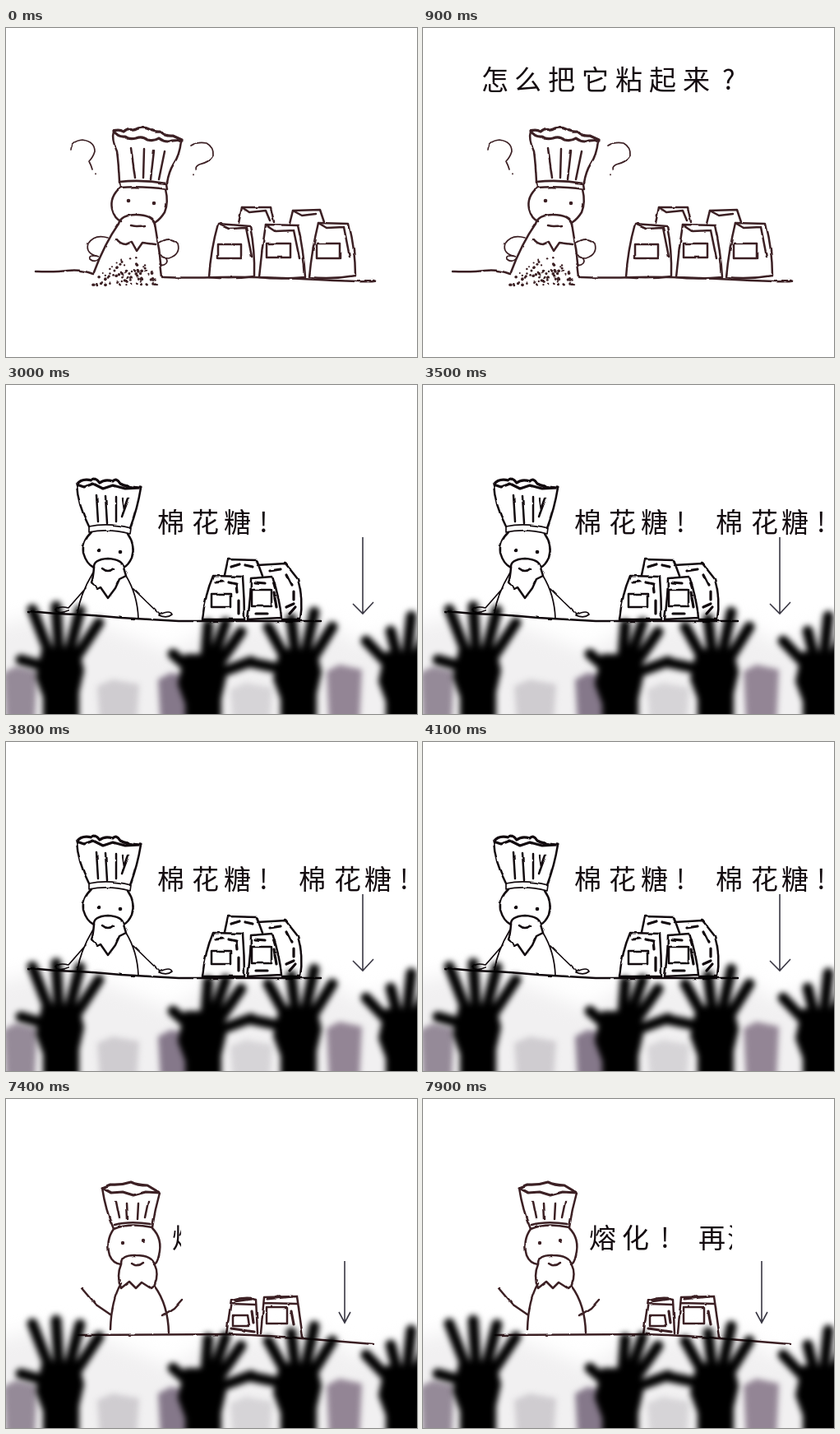
An HTML page that plays this animation: 500x400 px, repeating every 8 s.

```html
<!DOCTYPE html>
<html lang="zh">
<head>
<meta charset="utf-8">
<title>Chef sketch</title>
<style>
html, body { margin: 0; width: 100%; height: 100%; overflow: hidden; background: #fff; }
#stage { position: relative; width: 500px; height: 400px; overflow: hidden; }
svg { position: absolute; left: 0; top: 0; width: 500px; height: 400px; overflow: hidden; }

.scene, .crowd { visibility: hidden; animation: 8s step-end infinite; }
.scene { --ink: #3c2024; }
.puzzled { animation-name: show-puzzled; }
.shout { animation-name: show-shout; --ink: #120a0e; }
.ask { animation-name: show-ask; }
.melt { animation-name: show-melt; }
.crowd { animation-name: show-crowd; mix-blend-mode: multiply; }
@keyframes show-puzzled { 0% { visibility: visible } 31.25%, 100% { visibility: hidden } }
@keyframes show-shout { 0%, 60% { visibility: hidden } 31.25% { visibility: visible } }
@keyframes show-ask { 0%, 92.5% { visibility: hidden } 60% { visibility: visible } }
@keyframes show-melt { 0% { visibility: hidden } 92.5%, 100% { visibility: visible } }
@keyframes show-crowd { 0%, 60% { visibility: hidden } 31.25%, 92.5%, 100% { visibility: visible } }

.ink { fill: none; stroke: var(--ink); stroke-width: 2.5; stroke-linecap: round; stroke-linejoin: round; filter: url(#rough); }
.thin { stroke-width: 1.7; }
.bold { stroke-width: 3.2; }
.dot { fill: var(--ink); stroke: none; }
.arrow { fill: none; stroke: #3a3844; stroke-width: 1.6; }

/* Lettering is uncovered from left to right in 100 ms steps */
.words { font: 300 33px "Noto Sans CJK SC", "Noto Sans CJK", sans-serif; fill: #140c10; animation: 8s linear infinite; }
.puzzled .words { animation-name: write-puzzled; }
.shout .words { animation-name: write-shout; }
.ask .words { animation-name: write-ask; }
.melt .words { animation-name: write-melt; }
@keyframes write-puzzled {
  0% { width: 71px; animation-timing-function: steps(9) }
  11.25%, 100% { width: 384px }
}
@keyframes write-shout {
  0% { width: 185px }
  31.25% { width: 185px; animation-timing-function: steps(10) }
  43.75%, 100% { width: 500px }
}
@keyframes write-ask {
  0% { width: 128px }
  61.25% { width: 128px; animation-timing-function: steps(5) }
  67.5%, 100% { width: 268px }
}
@keyframes write-melt {
  0% { width: 180px }
  91.25% { width: 180px; animation-timing-function: steps(6) }
  98.75%, 100% { width: 376px }
}
</style>
</head>
<body>
<div id="stage">

<div class="scene puzzled">
  <svg>
    <defs>
      <filter id="rough" filterUnits="userSpaceOnUse" x="0" y="0" width="500" height="400" color-interpolation-filters="sRGB">
        <feTurbulence type="fractalNoise" baseFrequency=".06" numOctaves="2" seed="4"/>
        <feDisplacementMap in="SourceGraphic" scale="2.5" xChannelSelector="R" yChannelSelector="G"/>
      </filter>
    </defs>
    <g class="ink">
      <path d="M36 296Q60 297 75 295T106 299M192 303Q220 304 260 303T380 306T446 307"/>
      <path class="bold" d="M131 125Q138 123 143 126Q150 120 156 124Q165 119 173 123Q182 127 188 126Q195 132 203 131L214 136M131 125Q136 133 145 132Q150 136 158 134Q166 131 172 136Q180 138 186 134Q194 140 202 137L214 136"/>
      <path d="M131 126Q128 135 135 150Q137 165 138 187M213 138Q211 155 204 165Q198 175 196 188M152 146L157 182M168 147L167 182M180 149L176 184M193 150L186 184"/>
      <path d="M138 187Q165 184 195 189L196 196Q165 192 139 194Z"/>
      <path d="M139 194Q126 205 129 220Q132 232 140 235M194 196Q198 212 193 224Q188 232 182 236M137 238Q140 227 158 227Q178 227 181 238M152 240Q160 242 169 240"/>
      <path d="M134 256Q139 263 146 263L153 260L159 271L166 261L182 263M137 238Q120 262 107 297M181 238Q187 270 190 303"/>
      <path class="thin" d="M124 255Q108 250 100 262Q96 274 112 278Q100 275 102 281Q108 286 114 280M185 262Q200 252 209 262Q213 275 198 280Q190 280 186 275M187 277Q199 280 195 286Q191 290 187 287"/>
      <circle class="dot" cx="149" cy="210" r="2.3"/><circle class="dot" cx="180" cy="213" r="2.3"/>
      <path class="thin" d="M79 148Q80 137 93 136Q108 138 108 150Q106 157 101 162Q104 168 105 172M109 177v.5M225 143Q233 138 244 140Q253 145 252 155Q248 163 235 166Q231 168 231 171M228 178v.5"/>
      <path d="M247 303Q249 270 258 238L297 241Q303 270 302 302M247 303Q275 306 302 302M308 303Q311 270 316 239L355 240Q362 270 364 303M308 303Q335 306 364 303M369 303Q372 270 380 237L417 238Q425 270 425 301Q396 306 369 303"/>
      <path d="M258 263h28v17h-28zM317 262h29v17h-29zM378 262h28v18h-28zM283 237L287 218L322 218L326 236M345 238L349 222L382 221L387 236"/>
      <path d="M258 238L271 244L292 243M292 243L299 278M316 239L328 247L350 246M350 246L357 280M380 237L390 243L411 242M411 242L418 278M287 218L296 224L316 222L321 234M349 222L360 228L377 226"/>
      <g id="pile"></g>
    </g>
  </svg>
  <svg class="words"><text y="75" x="71 111 152 193 234 275 316 364">怎么把它粘起来?</text></svg>
</div>

<div class="scene shout">
  <svg>
    <g class="ink">
      <path d="M27 275L62 278Q100 279 140 283L210 287L383 287"/>
      <path class="bold" d="M86 121Q92 113 104 116Q108 111 114 119Q120 114 130 117Q134 112 139 120Q146 124 164 125M86 121L95 124L106 120L118 126L130 122L145 126L164 125"/>
      <path d="M86 121Q87 145 101 172M164 125Q160 150 151 174M110 134L112 166M121 135L123 168M134 136V166M149 138L141 160M142 138L144 152"/>
      <path class="thin" d="M101 172Q125 167 152 174L151 181Q125 174 101 179Z"/>
      <path d="M104 179Q92 190 94 204Q98 218 107 222M148 181Q158 195 153 210Q149 219 143 222M107 222Q106 212 124 211Q142 212 143 222M117 223Q124 229 131 223"/>
      <path d="M107 222Q106 235 104 240L111 248L115 246L124 259L133 247L138 236L146 232L143 222"/>
      <path class="thin" d="M106 228Q90 255 87 277M146 232Q160 255 161 284M97 247L76 271Q64 268 60 274Q64 279 77 274M155 248L187 279Q200 273 202 279Q196 284 186 280"/>
      <circle class="dot" cx="113" cy="201" r="2.3"/><circle class="dot" cx="139" cy="203" r="2.3"/>
      <path d="M239 285Q242 255 252 232L288 233Q290 260 290 285ZM266 231L270 212L305 213L312 232M294 285Q298 255 298 235L324 233Q333 260 335 283ZM306 219L340 217L355 236Q362 260 358 285H336"/>
      <path d="M250 254h23v16h-23zM299 249h24v20h-24z"/>
      <path class="bold" d="M255 240L264 239M271 240L280 242L281 252M283 262V278M274 221L284 218M291 219L300 221M303 240L315 241M326 252L329 270M321 226L334 224M341 231L347 243M350 251V261M341 270L350 266M345 278L352 270M304 278H318"/>
    </g>
    <path class="arrow" d="M434 185V277M422 266L434 278L447 264"/>
  </svg>
  <svg class="words"><text y="179" x="184 226 265 308 356 399 436 479">棉花糖!棉花糖!</text></svg>
</div>

<div class="scene ask">
  <svg>
    <g class="ink">
      <path d="M73 267L160 266L300 262L383 262"/>
      <path class="bold" d="M73 267L138 266M127 111L138 103L146 107L154 101L162 107L171 103L180 109L188 105L198 113M127 111L138 117L148 113L158 118L170 114L182 120L198 113"/>
      <path d="M127 112Q130 130 137 151M198 113Q192 130 189 148M148 122L151 142M158 122L160 145M171 123L170 145M183 121L178 143M138 154Q160 146 189 150"/>
      <path d="M140 153Q130 165 135 180Q138 186 141 189M189 151Q199 165 194 182Q190 191 183 194M140 189Q140 177 158 175Q178 175 183 189M157 186Q166 193 174 185"/>
      <path d="M140 189Q134 205 146 208L153 213L158 209L165 215L172 208Q182 213 185 206Q187 198 183 189M146 208Q134 230 134 265M183 208Q212 225 214 265"/>
      <path class="thin" d="M142 223Q122 222 121 235Q124 245 137 247Q122 250 124 256Q132 256 138 252"/>
      <path d="M208 230L218 204Q217 190 220 187Q225 190 227 196L247 197L232 200L249 201L234 204L246 206L218 207"/>
      <circle class="dot" cx="153" cy="167" r="2.2"/><circle class="dot" cx="173" cy="166" r="2.2"/>
      <path d="M242 263Q246 235 250 208L283 207Q290 235 294 262M268 206L275 187L302 185L312 205M313 205L318 187L350 184Q365 215 368 258L350 262M292 258Q294 235 298 207L337 205Q344 235 344 261"/>
      <path d="M252 231h26v17h-26zM302 225h24v16h-24z"/>
      <path d="M250 208L260 214L279 212M283 222L286 238M288 246L289 256M275 187L283 194L300 192M318 187L326 194L346 191M298 207L308 212L331 210M333 217L336 230M337 238V252M352 204L355 215M357 225L359 240"/>
    </g>
  </svg>
  <svg class="words"><text y="72" x="127 164 209 249" font-size="32">怎么做?</text></svg>
</div>

<div class="scene melt">
  <svg>
    <g class="ink">
      <path d="M88 287L270 286Q330 288 360 291L447 298"/>
      <path class="bold" d="M117 108L127 104Q140 105 152 101Q160 105 172 105L187 114M117 108L128 114L142 113L155 117L170 113L187 114"/>
      <path d="M117 108Q121 135 131 158M187 114Q181 135 178 156M134 125L138 145M147 127L148 146M161 127L160 146M173 125L169 144M131 158Q150 150 178 156M132 153Q150 148 176 152"/>
      <path d="M131 158Q121 172 126 190Q130 200 140 201M178 157Q191 170 186 190Q184 200 180 201M153 200Q160 205 167 199"/>
      <path d="M140 201Q140 189 158 190Q178 190 181 202Q186 212 181 226L176 230L165 223L158 230L150 222L140 230Q134 215 140 201M140 224Q128 245 127 280M181 228Q197 250 198 284"/>
      <path d="M92 230L108 249L127 262M191 263L205 254L214 244"/>
      <circle class="dot" cx="142" cy="175" r="2.2"/><circle class="dot" cx="167" cy="172" r="2.2"/>
      <path d="M268 286L274 245Q290 240 304 243L306 285M274 249L304 250M310 285L314 241L354 240L361 290M314 248L354 249M276 263h18l2 13h-20zM317 253h25v20h-25z"/>
      <path class="bold" d="M278 246L299 243M319 243L348 240M299 258L301 272M347 258L350 274M274 279L302 283"/>
    </g>
    <path class="arrow" d="M412 197V271M405 259L412 272L419 259"/>
  </svg>
  <svg class="words"><text y="181" x="202 242 289 335 370 411 452">熔化!再混合!</text></svg>
</div>

<svg class="crowd">
  <defs>
    <filter id="soft" filterUnits="userSpaceOnUse" x="-40" y="220" width="580" height="240" color-interpolation-filters="sRGB"><feGaussianBlur stdDeviation="3.5"/></filter>
    <filter id="haze" filterUnits="userSpaceOnUse" x="-60" y="200" width="620" height="280" color-interpolation-filters="sRGB"><feGaussianBlur stdDeviation="11"/></filter>
  </defs>
  <path fill="#f1f0f1" filter="url(#haze)" d="M-20 295L60 275L125 295L200 325L250 295L385 285L430 315L520 280V440H-20Z"/>
  <g id="far" filter="url(#soft)"></g>
  <g id="near" filter="url(#soft)" fill="#000" stroke="#000" stroke-linecap="round" stroke-linejoin="round"></g>
</svg>

</div>
<script>
const fill = (id, html) => { document.getElementById(id).innerHTML = html; };

// Loose crumbs heaped in front of the chef
let seed = 7;
const rand = () => (seed = seed * 16807 % 2147483647) / 2147483647;
fill('pile', Array.from({ length: 85 }, () => {
  const v = Math.sqrt(rand());
  const x = 148 + (rand() - .5) * (24 + 66 * v), y = 279 + 34 * v;
  return `<circle class="dot" cx="${x}" cy="${y}" r="${1 + rand() * .9}"/>`;
}).join(''));

// Blurred distant arms: x, y, width, colour
const arms = [
  [-6, 342, 44, '#958a98'], [108, 358, 54, '#cfccd0'], [182, 350, 46, '#85788a'],
  [270, 362, 54, '#d6d4d7'], [387, 340, 46, '#938595']
];
fill('far', arms.map(([x, y, w, c]) =>
  `<path fill="${c}" d="M${x + 6} 410L${x + 3} ${y + 8}L${x + w * .4} ${y}L${x + w} ${y + 6}L${x + w - 3} 410Z"/>`).join(''));

// Raised hands: palm centre, then fingertips from thumb to little finger
const hands = [
  [67, 345, [[18, 334], [32, 273], [61, 269], [90, 274], [113, 289]]],
  [240, 353, [[203, 327], [246, 291], [267, 289], [286, 300], [298, 336]]],
  [356, 347, [[296, 337], [319, 294], [347, 284], [375, 276], [397, 294]]],
  [484, 350, [[438, 311], [468, 299], [493, 281], [519, 288]]]
];
const hand = ([x, y, tips]) => {
  const fingers = tips.map(([a, b]) => {
    const kx = x + (a - x) * .4, ky = y + (b - y) * .25;
    return `M${a} ${b}L${kx} ${ky}L${x} ${y + 12}`;
  }).join('');
  return `<path fill="none" stroke-width="13" d="${fingers}"/>
    <path stroke-width="8" d="M${x - 20} ${y - 22}L${x + 18} ${y - 22}L${x + 24} ${y + 2}L${x + 18} ${y + 28}V410H${x - 18}V${y + 34}L${x - 27} ${y + 10}Z"/>`;
};
fill('near', hands.map(hand).join(''));
</script>
</body>
</html>
```
